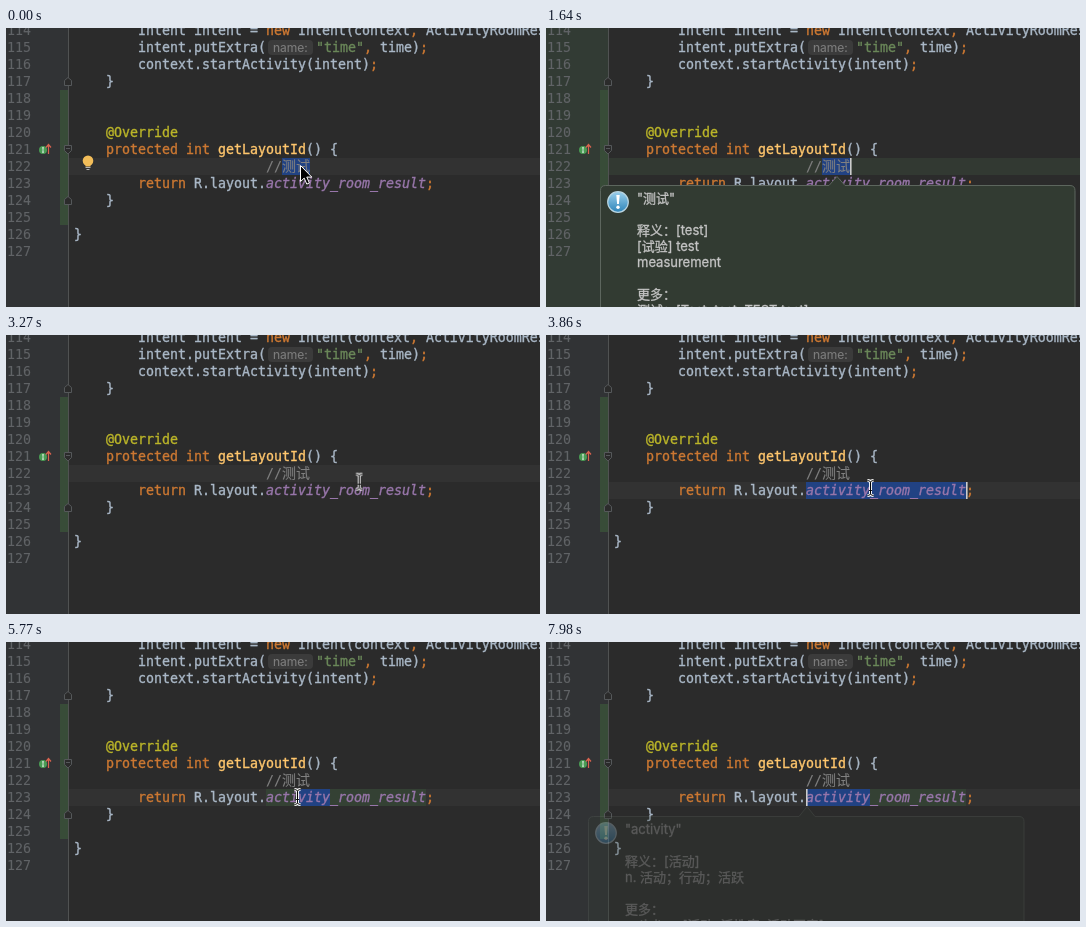
Animation, 534 px wide and 279 px high, one loop 8000 ms. Source, as an HTML page:

```html
<!DOCTYPE html>
<html lang="zh-CN">
<head>
<meta charset="utf-8">
<title>Editor translation popup</title>
<style>
html, body { margin: 0; width: 100%; height: 100%; overflow: hidden; background: #2b2b2b; }
svg { display: block; width: 534px; height: 279px; }
text { white-space: pre; fill: currentColor; stroke: currentColor; }
.code { font: 13.29px "DejaVu Sans Mono", "Noto Sans CJK SC", monospace; color: #a9b7c6; stroke-width: .35; }
.numbers { color: #606366; stroke-width: .1; }
.key { color: #cc7832; }
.note { color: #bbb529; }
.method { color: #ffc66d; }
.string { color: #6a8759; }
.field { color: #9876aa; font-style: italic; }
.comment { color: #808080; stroke-width: .1; }
.key, .method, .string, .field { fill: currentColor; stroke: currentColor; }
.cjk { font: 14px "Noto Sans CJK SC", sans-serif; }
.hint { font: 12px Inter, sans-serif; color: #7d7d7d; stroke-width: .1; }
.popup { font: 13px Inter, "Noto Sans CJK SC", sans-serif; color: #c4c4c4; stroke-width: .3; }
.balloon { fill: #323b32; stroke: #5d665e; stroke-width: 1; }
.fold { fill: #2b2b2b; stroke: #55585a; }
.selection { fill: #214283; }

.gutter, .row, .word, .usage, .ident, .drag, .caret, .blink, .bulb, .arrow, .beam, .first, .second {
  animation: 8s step-end infinite;
}
.gutter { animation-name: gutter; }
.row { animation-name: row; }
.word { animation-name: word; }
.usage { animation-name: usage; }
.ident { animation-name: ident; }
.drag { animation-name: drag; transform-box: fill-box; transform-origin: right; }
.caret { animation-name: caret; }
.blink { animation-name: blink; }
.bulb { animation-name: bulb; }
.arrow { animation-name: arrow; }
.beam { animation-name: beam; }
.first { animation-name: first; }
.second { animation-name: second; }

@keyframes gutter {
  0%, 40.7%, 100% { fill: #313335; }
  12.9% { fill: #323b34; }
}
@keyframes row {
  0% { fill: #323232; transform: none; }
  12.9% { fill: #323932; transform: none; }
  40.7% { fill: #323232; transform: none; }
  42.6%, 100% { fill: #323232; transform: translateY(17px); }
}
@keyframes word { 0% { opacity: 1; } 37.1%, 100% { opacity: 0; } }
@keyframes usage { 0% { opacity: 0; } 42.6%, 100% { opacity: 1; } }
@keyframes ident { 0% { opacity: 0; } 42.6% { opacity: 1; } 61%, 100% { opacity: 0; } }
@keyframes drag {
  0% { transform: scaleX(0); }
  68.3% { transform: scaleX(0); animation-timing-function: steps(4); }
  75.7%, 100% { transform: scaleX(1); }
}
@keyframes caret {
  0% { transform: translate(304px, 130px); }
  42.6% { transform: translate(420px, 147px); }
  61% { transform: translate(324px, 147px); }
  68.3% { transform: translate(324px, 147px); animation-timing-function: steps(4); }
  75.7%, 100% { transform: translate(260px, 147px); }
}
@keyframes blink {
  0%, 12.9%, 25.8%, 37.9%, 50%, 67.5%, 87.5% { opacity: 0; }
  5.5%, 18.5%, 31.4%, 42.6%, 56%, 74%, 93.7%, 100% { opacity: 1; }
}
@keyframes bulb { 0% { opacity: 1; } 9.3%, 100% { opacity: 0; } }
@keyframes arrow { 0% { opacity: 1; } 7.4%, 100% { opacity: 0; } }
@keyframes beam {
  0% { opacity: 0; transform: translate(330px, 140px); }
  29.7% { opacity: 1; transform: translate(330px, 140px); animation-timing-function: steps(2); }
  33.3% { opacity: 1; transform: translate(410px, 134px); }
  37.1% { opacity: 1; transform: translate(410px, 134px); animation-timing-function: steps(3); }
  42.6% { opacity: 1; transform: translate(324px, 153px); }
  61% { opacity: 1; transform: translate(323px, 155px); }
  68.3% { opacity: 1; transform: translate(323px, 155px); animation-timing-function: steps(4); }
  75.7% { opacity: 1; transform: translate(259px, 155px); }
  92.4%, 100% { opacity: 0; transform: translate(259px, 155px); }
}
@keyframes first {
  0% { opacity: 0; }
  9.3% { opacity: .3; }
  11.2% { opacity: .6; }
  12.9% { opacity: 1; }
  37.1% { opacity: .6; }
  38.8% { opacity: .3; }
  40.7%, 100% { opacity: 0; }
}
@keyframes second { 0% { opacity: 0; } 99.7%, 100% { opacity: .3; } }
</style>
</head>
<body>
<svg viewBox="0 0 534 279">
  <defs>
    <linearGradient id="blue" x2="0" y2="1">
      <stop stop-color="#9bd0ec"/><stop offset="1" stop-color="#2d84b9"/>
    </linearGradient>
    <g id="info" stroke="none">
      <circle cx="18" cy="17" r="10.3" fill="url(#blue)" stroke="#b9d5e2" stroke-width="1.2"/>
      <path d="M16.3 10h3.4l-.8 9h-1.8z" fill="#fff"/>
      <circle cx="18" cy="22.2" r="1.7" fill="#fff"/>
    </g>
    <path id="foldEnd" class="fold" d="M58.500 4.500h7v-5l-3.500-3-3.500 3z"/>
    <path id="ibeam" d="M-2.500-7.500q3 0 3 2V5.500q0 2-3 2M3.500-7.500q-3 0-3 2V5.500q0 2 3 2M-1 2.500h3"/>
  </defs>

  <rect width="534" height="279" fill="#2b2b2b"/>
  <rect class="gutter" width="62" height="279"/>
  <rect class="row" x="62" y="130" width="472" height="17"/>
  <rect x="54" y="62" width="8" height="135" fill="#384c38"/>
  <path d="M62.500 0V279" stroke="#505252"/>

  <rect class="word selection" x="276" y="130" width="28" height="17"/>
  <rect class="usage" x="260" y="147" width="160" height="17" fill="#344134"/>
  <rect class="ident selection" x="260" y="147" width="160" height="17"/>
  <rect class="drag selection" x="260" y="147" width="64" height="17"/>

  <g id="numbers" class="code numbers"></g>
  <use href="#foldEnd" y="53"/>
  <use href="#foldEnd" y="172"/>
  <path class="fold" d="M58.500 117.500h7v5l-3.500 3.500-3.500-3.500zM60 120.500h4"/>
  <circle cx="37" cy="122" r="4" fill="#499c54"/>
  <path d="M36 119.800h2M37 119.800v4.400M36 124.200h2" stroke="#d5e5d7" fill="none"/>
  <path d="M42.500 126v-9M40 119.500l2.500-3 2.500 3" stroke="#d9634f" stroke-width="1.200" fill="none"/>

  <g class="code">
    <text x="132" y="7">Intent intent = <tspan class="key">new</tspan> Intent(context<tspan class="key">,</tspan> ActivityRoomResult</text>
    <text x="132" y="24">intent.putExtra(</text>
    <rect x="262" y="12" width="45" height="15" rx="4" fill="#3b3b3b"/>
    <text class="hint" x="267" y="23.500">name:</text>
    <text x="310" y="24"><tspan class="string">"time"</tspan><tspan class="key">,</tspan> time)<tspan class="key">;</tspan></text>
    <text x="132" y="41">context.startActivity(intent)<tspan class="key">;</tspan></text>
    <text x="100" y="58">}</text>
    <text class="note" x="100" y="109">@Override</text>
    <text x="100" y="126"><tspan class="key">protected int </tspan><tspan class="method">getLayoutId</tspan>() {</text>
    <text class="comment" x="260" y="143">//<tspan class="cjk">测试</tspan></text>
    <text x="132" y="160"><tspan class="key">return</tspan> R.layout.<tspan class="field">activity_room_result</tspan><tspan class="key">;</tspan></text>
    <text x="100" y="177">}</text>
    <text x="68" y="211">}</text>
  </g>

  <g class="caret"><rect class="blink" width="1.600" height="17" fill="#ccc"/></g>

  <g class="bulb">
    <circle cx="82" cy="132.700" r="5.300" fill="#f2bd59"/>
    <path d="M79.500 136h5v2.500h-5z" fill="#f2bd59"/>
    <path d="M79.500 139.500h5M80.500 141.500h3" stroke="#b5b5b5"/>
  </g>

  <g class="popup first">
    <g transform="translate(54 157)">
      <path class="balloon" d="M.5 130V5.500q0-5 5-5H229l8-9 8 9H470q5 0 5 5V130z"/>
      <use href="#info"/>
      <text x="37" y="17.500">"测试"</text>
      <text x="37" y="49.500">释义：[test]</text>
      <text x="37" y="66">[试验] test</text>
      <text x="37" y="82">measurement</text>
      <text x="37" y="114">更多：</text>
      <text x="37" y="130">测试：[Test, test, TEST test]</text>
    </g>
  </g>

  <g class="popup second">
    <g transform="translate(42 174)">
      <path class="balloon" d="M.5 130V5.500q0-5 5-5H211l8-10 8 10H431q5 0 5 5V130z"/>
      <use href="#info"/>
      <text x="37" y="17.500">"activity"</text>
      <text x="37" y="49.500">释义：[活动]</text>
      <text x="37" y="66">n. 活动；行动；活跃</text>
      <text x="37" y="98">更多：</text>
      <text x="37" y="114">activity：[活动, 活性度, 活动写意]</text>
    </g>
  </g>

  <path class="arrow" d="M294.500 137.500v16l3.700-3.400 2.600 6 2.600-1.100-2.600-5.900h5z" fill="#000" stroke="#fff"/>
  <g class="beam" fill="none">
    <use href="#ibeam" stroke="#fff" stroke-width="2.800"/>
    <use href="#ibeam" stroke="#000" stroke-width=".9"/>
  </g>
</svg>
<script>
const numbers = document.getElementById("numbers");
for (let line = 114; line <= 127; line++) {
  const label = document.createElementNS("http://www.w3.org/2000/svg", "text");
  label.setAttribute("x", 1);
  label.setAttribute("y", 7 + 17 * (line - 114));
  label.textContent = line;
  numbers.append(label);
}
</script>
</body>
</html>
```
